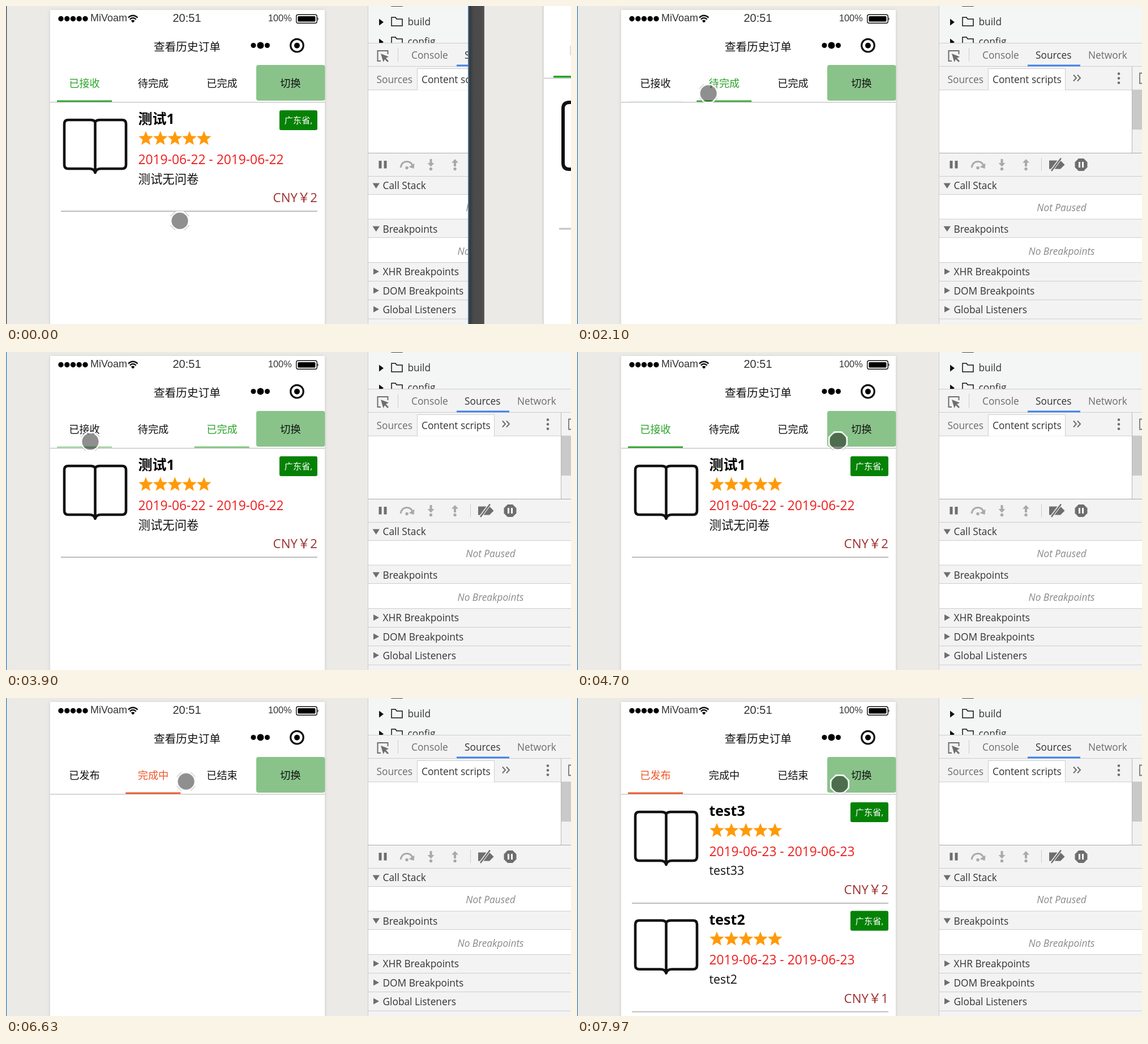
Animation, 998 px wide and 561 px high, one loop 8 s. Source, as an HTML page:

```html
<!DOCTYPE html>
<html lang="zh">
<head>
<meta charset="utf-8">
<title>Order history</title>
<style>
@property --on { syntax: "<number>"; inherits: true; initial-value: 0; }
html, body { margin: 0; width: 100%; height: 100%; overflow: hidden; background: #ebeae6; }
svg { display: block; width: 998px; height: 561px; }
text { font-family: "Open Sans", "Noto Sans CJK SC", "Noto Sans CJK", sans-serif; fill: #111; }
.mid { text-anchor: middle; }
.status text { font-family: "Liberation Sans", Arial, sans-serif; fill: #333; }
.line { fill: none; stroke: #111; }

/* phone */
.name { font-size: 25px; font-weight: 700; fill: #000; }
.date { font-size: 22.8px; fill: #ee1c1c; }
.desc { font-size: 21.4px; }
.price { font-size: 22.3px; fill: #a03030; text-anchor: end; }
.tag { font-size: 15.2px; fill: #fff; }
.tab text, .label { font-size: 18.2px; text-anchor: middle; }
.tab text { fill: color-mix(in srgb, var(--tint) clamp(0%, calc((var(--on) - .5) * 4000%), 100%), #111); }
.tab rect { fill: var(--tint); opacity: var(--on); }
.green { --tint: #29a329; }
.red { --tint: #ee5526; }

/* developer tools */
.tools { font-size: 17.3px; }
.tools text { fill: #333; }
.tools .dim { fill: #6b6b6b; }
.tools .none { fill: #8a8a8a; font-style: italic; text-anchor: middle; }
.bar { fill: #f3f3f3; }
.rule { fill: none; stroke: #cdcdcd; }
.icon { fill: #6e6e6e; }
.pale { fill: #a9a9a9; }

/* timeline */
.tab { animation: 8s linear infinite; }
.a1 { animation-name: a1; } .a2 { animation-name: a2; } .a3 { animation-name: a3; }
.b1 { animation-name: b1; } .b2 { animation-name: b2; } .b3 { animation-name: b3; }
.green, .red, .listA, .listB, .other { animation: 8s step-end infinite; }
.green { animation-name: modeA; }
.red { animation-name: modeB; }
.listA { animation-name: listA; }
.listB { animation-name: listB; }
.other { animation-name: other; }
.pointer { animation: move 8s ease-in-out infinite; }

@keyframes a1 { 0%, 23.125% { --on: 1 } 26.5%, 47.375% { --on: 0 } 50.75%, 100% { --on: 1 } }
@keyframes a2 { 0%, 23.125% { --on: 0 } 26.5%, 37.75% { --on: 1 } 41.125%, 100% { --on: 0 } }
@keyframes a3 { 0%, 37.75% { --on: 0 } 41.125%, 47.375% { --on: 1 } 50.75%, 100% { --on: 0 } }
@keyframes b1 { 0%, 76.875% { --on: 1 } 80.25%, 94.375% { --on: 0 } 97.75%, 100% { --on: 1 } }
@keyframes b2 { 0%, 76.875% { --on: 0 } 80.25%, 86.875% { --on: 1 } 90.25%, 100% { --on: 0 } }
@keyframes b3 { 0%, 86.875% { --on: 0 } 90.25%, 94.375% { --on: 1 } 97.75%, 100% { --on: 0 } }
@keyframes modeA { 0% { opacity: 1 } 67.25%, 100% { opacity: 0 } }
@keyframes modeB { 0% { opacity: 0 } 67.25%, 100% { opacity: 1 } }
@keyframes listA { 0% { opacity: 1 } 23.75% { opacity: 0 } 48.75% { opacity: 1 } 67.25%, 100% { opacity: 0 } }
@keyframes listB { 0% { opacity: 0 } 67.25% { opacity: 1 } 78.1% { opacity: 0 } 95.6%, 100% { opacity: 1 } }
@keyframes other { 0% { opacity: 1 } 14.625%, 100% { opacity: 0 } }
@keyframes move {
  0%, .375% { transform: translate(307px, 379px) }
  10.375%, 12.125% { transform: translate(202px, 149px) }
  13.75%, 14.625% { transform: translate(203px, 154px) }
  21.25%, 25% { transform: translate(226px, 154px) }
  32.9% { transform: translate(345px, 157px) }
  33.75% { transform: translate(352px, 157px) }
  36.6% { transform: translate(352px, 157px); animation-timing-function: ease-in }
  39.625% { transform: translate(210px, 159px); animation-timing-function: ease-out }
  43.75%, 48.75% { transform: translate(149px, 158px) }
  56.6%, 57.9% { transform: translate(465px, 156px) }
  58.75% { transform: translate(461px, 157px) }
  63.4%, 67.25% { transform: translate(456px, 152px) }
  73.375%, 77.2% { transform: translate(239px, 123px) }
  86.25%, 86.9% { transform: translate(350px, 157px) }
  91.25%, 94.6% { transform: translate(182px, 148px) }
  99.625%, 100% { transform: translate(464px, 152px) }
}
</style>
</head>
<body>
<svg viewBox="0 0 998 561" xmlns="http://www.w3.org/2000/svg">
  <defs>
    <path id="star" fill="#ff9a08" d="M0-13.5 3.5-4.7 12.8-4.2 5.6 1.8 8 11 0 5.9-8 11-5.6 1.8-12.8-4.2-3.5-4.7Z"/>
    <g id="item">
      <path class="line" stroke-width="4.6" stroke-linejoin="round" d="M157.500 205Q156 201 149 201H110Q103 201 103 208V280Q103 287 110 287H147Q156 287 157.500 294Q159 287 168 287H205Q212 287 212 280V208Q212 201 205 201H166Q159 201 157.500 205V294"/>
      <use href="#star" x="247" y="234"/><use href="#star" x="272.700" y="234"/><use href="#star" x="298.400" y="234"/>
      <use href="#star" x="324" y="234"/><use href="#star" x="349.700" y="234"/>
      <rect x="483" y="184" width="67" height="35" rx="3" fill="#058205"/>
      <text class="tag mid" x="516.500" y="207">广东省,</text>
      <rect x="97" y="361" width="453" height="2" fill="#bdbdbd"/>
    </g>
    <path id="open" d="M647.500 312.500H660L653.700 322Z"/>
    <path id="shut" d="M649-5.500 659 0 649 5.500Z"/>
    <g id="folder">
      <path class="line" stroke="#333" stroke-width="1.500" d="M681 35V20H688L690 23H700V35Z"/>
    </g>
    <linearGradient id="edge">
      <stop offset="0" stop-color="#333"/><stop offset=".3" stop-color="#4a4a4a"/>
      <stop offset=".9" stop-color="#4c4c4c"/><stop offset="1" stop-color="#666"/>
    </linearGradient>
    <filter id="soft" x="-5%" width="110%"><feGaussianBlur stdDeviation="3"/></filter>
    <clipPath id="tree"><rect x="640" width="358" height="66"/></clipPath>
  </defs>

  <rect width="998" height="561" fill="#ebeae6"/>
  <rect width="1.200" height="561" fill="#2577bd"/>

  <rect x="78" y="8" width="485" height="570" fill="#000" opacity=".13" filter="url(#soft)"/>
  <rect x="78" y="7" width="485" height="554" fill="#fff"/>

  <g class="status">
    <g fill="#000"><circle cx="97" cy="22.500" r="4.700"/><circle cx="107.800" cy="22.500" r="4.700"/><circle cx="118.500" cy="22.500" r="4.700"/><circle cx="129.200" cy="22.500" r="4.700"/><circle cx="140" cy="22.500" r="4.700"/></g>
    <text x="149" y="27" font-size="18">MiVoam</text>
    <path class="line" stroke-width="2.400" d="M216 20.500Q224 13 232.500 20.500M218.800 23.700Q224 18.500 229.700 23.700"/>
    <path d="M220.800 26Q224 23 227.500 26L224.200 29.500Z"/>
    <text class="mid" x="319.500" y="28" font-size="20">20:51</text>
    <text x="463" y="27" font-size="16.300">100%</text>
    <rect class="line" x="512.800" y="15.200" width="36.500" height="15" rx="3" stroke-width="1.400"/>
    <rect x="515.500" y="18" width="31" height="9.500" rx="1.500"/>
    <path d="M550.500 20Q553 22.700 550.500 25.500Z"/>
  </g>

  <text class="mid" x="320" y="78.500" font-size="19.700">查看历史订单</text>
  <circle cx="437" cy="69.500" r="4.500"/><circle cx="449.500" cy="69.500" r="6"/><circle cx="461.500" cy="69.500" r="4.500"/>
  <circle class="line" cx="514" cy="69.700" r="11.300" stroke-width="3.200"/><circle cx="514" cy="69.700" r="5"/>

  <rect x="78" y="169" width="485" height="1.500" fill="#c9c9c9"/>
  <rect x="442" y="104" width="121.500" height="63" rx="4" fill="#89c38a"/>
  <text class="label" x="502.500" y="142.500">切换</text>

  <g class="green">
    <g class="tab a1"><text x="138.500" y="142.500">已接收</text><rect x="90" y="166.500" width="97" height="2.700"/></g>
    <g class="tab a2"><text x="260" y="142.500">待完成</text><rect x="211.300" y="166.500" width="97" height="2.700"/></g>
    <g class="tab a3"><text x="381.500" y="142.500">已完成</text><rect x="332.700" y="166.500" width="97" height="2.700"/></g>
  </g>
  <g class="red">
    <g class="tab b1"><text x="138.500" y="142.500">已发布</text><rect x="90" y="166.500" width="97" height="2.700"/></g>
    <g class="tab b2"><text x="260" y="142.500">完成中</text><rect x="211.300" y="166.500" width="97" height="2.700"/></g>
    <g class="tab b3"><text x="381.500" y="142.500">已结束</text><rect x="332.700" y="166.500" width="97" height="2.700"/></g>
  </g>

  <g class="listA">
    <use href="#item"/>
    <text class="name" x="233.500" y="208">测试1</text>
    <text class="date" x="233.500" y="278.500">2019-06-22 - 2019-06-22</text>
    <text class="desc" x="233.500" y="312.500">测试无问卷</text>
    <text class="price" x="550" y="346">CNY￥2</text>
  </g>
  <g class="listB">
    <use href="#item"/>
    <text class="name" x="233.500" y="208">test3</text>
    <text class="date" x="233.500" y="278.500">2019-06-23 - 2019-06-23</text>
    <text class="desc" x="233.500" y="312">test33</text>
    <text class="price" x="550" y="346">CNY￥2</text>
    <g transform="translate(0 191.500)">
      <use href="#item"/>
      <text class="name" x="233.500" y="208">test2</text>
      <text class="date" x="233.500" y="278.500">2019-06-23 - 2019-06-23</text>
      <text class="desc" x="233.500" y="312">test2</text>
      <text class="price" x="550" y="346">CNY￥1</text>
    </g>
  </g>

  <g class="tools">
    <rect x="640" width="358" height="561" fill="#fff"/>
    <g clip-path="url(#tree)">
      <rect x="640" width="358" height="66" fill="#f4f6f6"/>
      <use href="#folder" y="-35"/><use href="#folder"/><use href="#folder" y="35"/>
      <path d="M659 22.500 667 28.500 659 34.500ZM659 57.500 667 63.500 659 69.500Z" fill="#111"/>
      <text x="709.500" y="34">build</text><text x="709.500" y="69">config</text>
    </g>

    <path class="bar" d="M640 66H998V148H640ZM640 260H998V300H640ZM640 301H998V332H640ZM640 376H998V408H640ZM640 452H998V561H640Z"/>
    <path class="rule" d="M639.500 0V561M640 65.500H998M640 106.500H998M640 148H998M640 300.500H998M640 332.500H998M640 376H998M640 408.500H998M640 452.500H998M640 485.500H998M640 518.500H998M640 552H998M692.500 74V98M820.500 268V291"/>
    <path class="line" stroke="#aaa" style="stroke:#aaa" d="M640 259.500H998"/>

    <path class="line" style="stroke:#6e6e6e" stroke-width="2" d="M662 97H656.500V79H674.500V85"/>
    <path class="icon" d="M662 84 676 89.500 671 92 676 97 674 99 669 94 666.500 99Z"/>
    <text class="dim" x="716" y="92.500">Console</text>
    <text x="810" y="92.500">Sources</text>
    <text class="dim" x="903" y="92.500">Network</text>
    <rect x="796" y="103.500" width="93" height="3" fill="#3f82ee"/>

    <text class="dim" x="654.500" y="136">Sources</text>
    <path d="M726.500 148.500V110.500H862.500V148.500" fill="#fff" stroke="#cdcdcd"/>
    <text x="734" y="136">Content scripts</text>
    <path class="line" style="stroke:#6e6e6e" stroke-width="2" d="M877 121.500 882 127 877 132.500M884 121.500 889 127 884 132.500"/>
    <g class="icon"><circle cx="957" cy="119.500" r="2.300"/><circle cx="957" cy="127.500" r="2.300"/><circle cx="957" cy="135.500" r="2.300"/></g>
    <path class="line" style="stroke:#777" stroke-width="1.800" d="M1000 118.500H994V136.500H1000"/>
    <rect x="981" y="148" width="17" height="111" fill="#f1f1f1"/>
    <rect x="981" y="148" width="17" height="70" fill="#c9c9c9"/>
    <path class="rule" style="stroke:#b5b5b5" d="M980.500 107V259"/>

    <path class="icon" d="M658.500 273H663.500V286.500H658.500ZM667.500 273H672.500V286.500H667.500Z"/>
    <path class="line" style="stroke:#a9a9a9" stroke-width="3" d="M697 285Q699 274.500 708 274.500Q715 274.500 718 281"/>
    <path class="pale" d="M721.500 277.500 720.500 287 711.500 284ZM748.500 270H752.500V277H756.500L750.500 283.500 744.500 277H748.500ZM793 270 799 276.500H795V283H791V276.500H787Z"/>
    <g class="pale"><circle cx="708" cy="285.500" r="2.700"/><circle cx="750.500" cy="287.500" r="2.700"/><circle cx="793" cy="287.500" r="2.700"/></g>
    <path class="icon" d="M834 272.500H854L861.500 280 854 287.500H834Z"/>
    <path class="line" style="stroke:#f3f3f3" stroke-width="5" d="M837 292 855 268"/>
    <path class="line" style="stroke:#6e6e6e" stroke-width="2.500" d="M838 291 855 268.500"/>
    <path class="icon" d="M886 269H895L901.500 275.500V284.500L895 291H886L879.500 284.500V275.500Z"/>
    <path d="M886 275H889V285H886ZM892 275H895V285H892Z" fill="#fff"/>

    <g class="icon">
      <use href="#open"/><use href="#open" y="76"/>
      <use href="#shut" y="468.500"/><use href="#shut" y="502"/><use href="#shut" y="535"/>
    </g>
    <text x="665.500" y="323">Call Stack</text>
    <text class="none" x="856" y="362">Not Paused</text>
    <text x="665.500" y="399.500">Breakpoints</text>
    <text class="none" x="856" y="438.500">No Breakpoints</text>
    <text x="665.500" y="475">XHR Breakpoints</text>
    <text x="665.500" y="508.500">DOM Breakpoints</text>
    <text x="665.500" y="541.500">Global Listeners</text>
  </g>

  <g class="other">
    <rect width="1.200" height="561" fill="#444"/>
    <rect x="816" width="182" height="561" fill="#ebeae6"/>
    <rect x="816" width="1.500" height="561" fill="#2577bd"/>
    <rect x="817.500" width="27.500" height="561" fill="url(#edge)"/>
    <rect x="947" width="60" height="561" fill="#000" opacity=".06"/>
    <rect x="950" width="48" height="561" fill="#fff"/>
    <rect x="996" y="70" width="2" height="17" fill="#ddd"/>
    <rect x="950" y="126.500" width="48" height="2" fill="#cfcfcf"/>
    <rect x="967" y="123" width="31" height="3.500" fill="#29a329"/>
    <path class="line" stroke-width="6" d="M1010 170H995Q984 170 984 181V277Q984 288 995 288H1010"/>
    <rect x="977" y="391.500" width="21" height="3" fill="#c4c4c4"/>
  </g>

  <g class="pointer">
    <path fill="none" stroke="#fff" stroke-width="2.400" d="M-7-15.800H7L15.800-7V7L7 15.800H-7L-15.800 7V-7Z"/>
    <path fill="none" stroke="#a5a5a5" d="M-16.500-8-8-16.500M8-16.500 16.500-8M16.500 8 8 16.500M-8 16.500-16.500 8"/>
    <circle r="14.600" fill="#000" opacity=".44"/>
  </g>
</svg>
</body>
</html>
```
